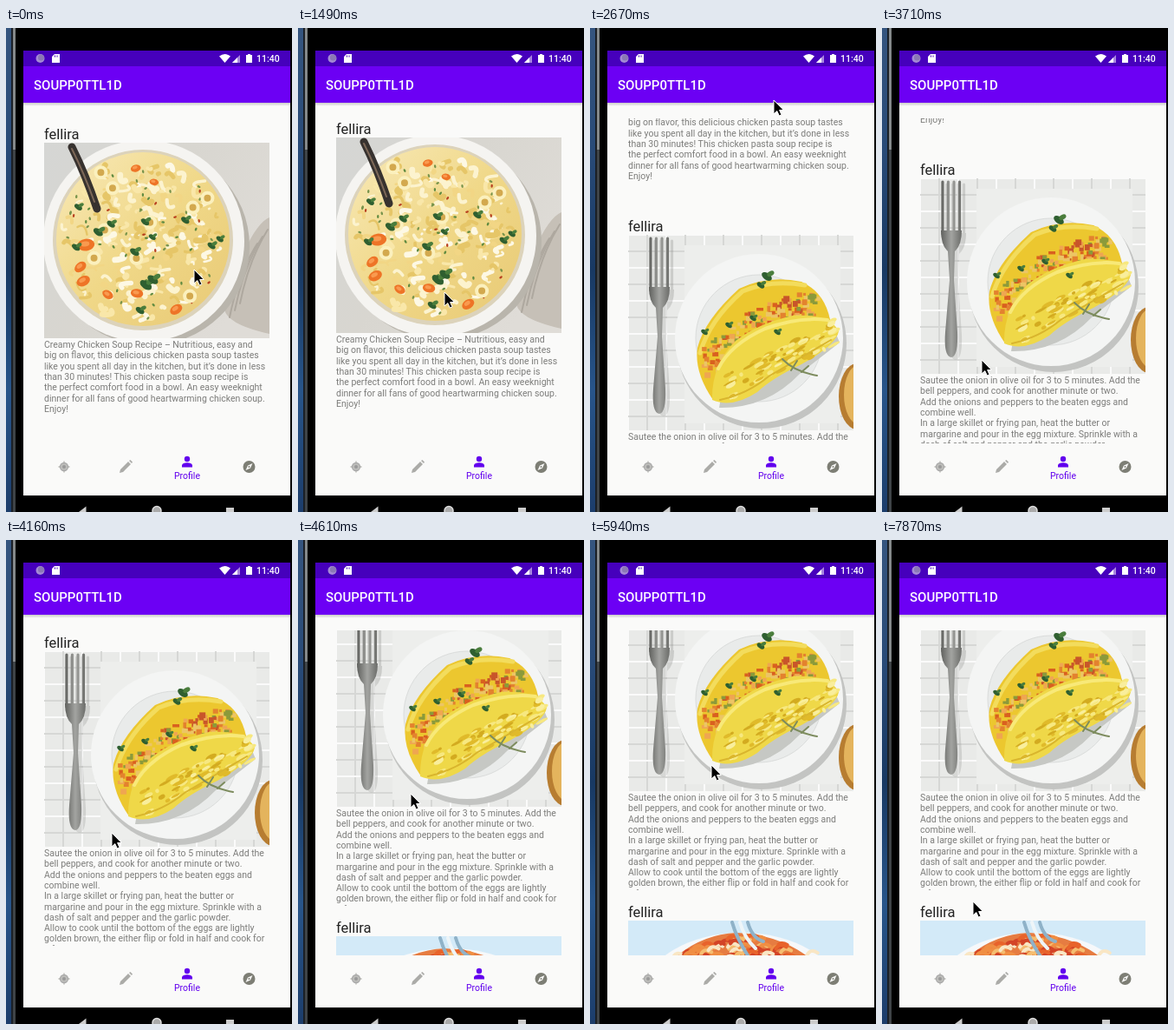
An HTML page that plays this animation: 330x557 px, repeating every 8 s.

```html
<!DOCTYPE html>
<html lang="en">
<head>
<meta charset="utf-8">
<title>Recipe feed</title>
<style>
  html, body { margin: 0; width: 100%; height: 100%; overflow: hidden; background: #000; }
  svg { display: block; width: 330px; height: 557px; font-family: Roboto, sans-serif; }
  .name { font-size: 16.5px; fill: #222; }
  .desc { font-size: 10.5px; fill: #7c7c7a; }
</style>
</head>
<body>
<svg id="stage" viewBox="0 0 330 557"></svg>
<script>
const LOOP = 8000, STEP = 148.5, PITCH = 374;

const linear = k => k;
const easeIn = k => k ** 1.79;
const easeOut = k => 1 - (1 - k) ** 2.1;
const move = (from, to, target, ease = linear) => ({ from, to, target, ease });

// Times are counted in screen updates.
const POINTER = [
  move(0, 1, [214, 271]),
  move(5, 7, [165, 322]),
  move(8, 16, [208, 98], easeIn),
  move(16, 18, [211, 82]),
  move(18, 22, [110, 411]),
  move(23, 31, [129, 291]),
  move(31, 37, [137, 270], easeOut),
  move(38, 40, [139, 258]),
  move(40, 44, [86, 390]),
  move(44, 48, [103, 413]),
  move(50, 53, [104, 415])
];
const SCROLL = [
  move(9, 16, [201], easeIn),
  move(16, 22, [318], easeOut),
  move(24, 31, [424]),
  move(31, 37, [442], easeOut)
];

function follow(position, moves, step) {
  for (const { from, to, target, ease } of moves) {
    if (step <= from) break;
    const k = ease(Math.min(1, (step - from) / (to - from)));
    position = position.map((v, i) => v + (target[i] - v) * k);
  }
  return position.map(Math.floor);
}

const SOUP_TEXT = [
  'Creamy Chicken Soup Recipe – Nutritious, easy and',
  'big on flavor, this delicious chicken pasta soup tastes',
  'like you spent all day in the kitchen, but it’s done in less',
  'than 30 minutes! This chicken pasta soup recipe is',
  'the perfect comfort food in a bowl. An easy weeknight',
  'dinner for all fans of good heartwarming chicken soup.',
  'Enjoy!'
];
const OMELETTE_TEXT = [
  'Sautee the onion in olive oil for 3 to 5 minutes. Add the',
  'bell peppers, and cook for another minute or two.',
  'Add the onions and peppers to the beaten eggs and',
  'combine well.',
  'In a large skillet or frying pan, heat the butter or',
  'margarine and pour in the egg mixture. Sprinkle with a',
  'dash of salt and pepper and the garlic powder.',
  'Allow to cook until the bottom of the eggs are lightly',
  'golden brown, the either flip or fold in half and cook for',
  'a few more minutes.'
];

function randomizer(seed) {
  const next = () => (seed = (seed * 16807) % 2147483647) / 2147483647;
  return {
    range: (a, b) => a + (b - a) * next(),
    pick: list => list[Math.floor(next() * list.length)],
    inDisc(cx, cy, radius) {
      const angle = next() * 2 * Math.PI, r = radius * Math.sqrt(next());
      return [cx + r * Math.cos(angle), cy + r * Math.sin(angle)];
    }
  };
}
const repeat = (n, fn) => Array.from({ length: n }, (_, i) => fn(i)).join('');
const path = (d, fill, extra = '') => `<path d="${d}" fill="${fill}" ${extra}/>`;
const line = (d, color, width) => path(d, 'none', `stroke="${color}" stroke-width="${width}" stroke-linecap="round"`);
const circle = (x, y, r, fill, extra = '') => `<circle cx="${x}" cy="${y}" r="${r}" fill="${fill}" ${extra}/>`;
const ellipse = (x, y, rx, ry, fill, turn = 0) =>
  `<ellipse rx="${rx}" ry="${ry}" fill="${fill}" transform="translate(${x} ${y}) rotate(${turn})"/>`;
const rect = (x, y, w, h, fill) => `<rect x="${x}" y="${y}" width="${w}" height="${h}" fill="${fill}"/>`;
const herb = (x, y, s = 1) =>
  ellipse(x, y, 6 * s, 3.5 * s, '#2f5f30', 35) + ellipse(x + 4 * s, y - 3 * s, 4 * s, 2.5 * s, '#4a7d3c', -30);

function soup() {
  const rnd = randomizer(77);
  const scatter = (n, draw) => repeat(n, () => draw(...rnd.inDisc(114, 111, 92)));
  const noodle = (x, y) => {
    const dx = rnd.range(-11, 11), dy = rnd.range(-9, 9);
    return line(`M${x} ${y}q${dy} ${-dx / 2} ${dx} ${dy}`,
      rnd.pick(['#fcf3cf', '#f9e7a9', '#e6c668', '#fdf8e4', '#f2d685']), rnd.range(2, 7));
  };
  const fleck = (x, y) => ellipse(x, y, 2, 1.2, rnd.pick(['#5f8a40', '#77934b', '#b8401f']), rnd.range(0, 180));
  const ring = (x, y) => circle(x, y, 6, '#d3a94e', 'stroke="#fbf0bd" stroke-width="4"');
  const carrot = (x, y) => {
    const r = rnd.range(5, 10), turn = rnd.range(-40, 40);
    return ellipse(x, y, r, r * .7, '#ee7427', turn) + ellipse(x - 1, y - 1, r * .5, r * .3, '#f99a4f', turn);
  };
  return rect(0, 0, 260, 225, 'url(#table)') +
    path('M260 86Q236 96 208 188Q206 208 260 220Z', '#c6c0b7') +
    repeat(3, i => line(`M${258 - i * 6} ${100 + i * 8}q-22 35 -32 85`, '#aea89f', 2)) +
    ellipse(121, 119, 116, 114, '#b9b5ac') + circle(115, 113, 116, '#f5f4f1') +
    circle(114, 112, 104, '#dcd3bb') + circle(114, 111, 100, 'url(#broth)') +
    scatter(170, noodle) + scatter(60, fleck) + scatter(9, ring) + scatter(8, carrot) +
    scatter(13, (x, y) => herb(x, y, rnd.range(.7, 1.3))) +
    line('M32 5Q48 37 61 76', '#37322f', 9) + line('M32 7Q46 35 58 68', '#7d6858', 2);
}

function omelette() {
  const rnd = randomizer(41);
  const weave = repeat(13, i => line(`M${i * 22} 0V225M0 ${i * 19}H260`, i % 2 ? '#d6d7d5' : '#fafafa', 2));
  // k runs along the fold from lower left to upper right.
  const alongFold = (lift, draw) => () => {
    const k = rnd.range(0, 1);
    return draw(90 + 125 * k, 143 - 65 * k - lift * Math.sin(Math.PI * k));
  };
  const dice = (x, y) => rect(x + rnd.range(-9, 9), y + rnd.range(-14, 16), rnd.range(3, 8), rnd.range(3, 7),
    rnd.pick(['#d9601f', '#e3822e', '#c8552a', '#ecc565', '#8b9a3a', '#efa651']));
  const brown = (x, y) => ellipse(x + rnd.range(18, 30), y + rnd.range(18, 48), rnd.range(2, 8), rnd.range(1, 3),
    rnd.pick(['#d3ab20', '#f7e880', '#e0ba2a', '#f9ee9c']), -28);
  const fork = repeat(4, i => line(`M${26 + i * 6.5} 4V64`, 'url(#steel)', 3.2)) +
    path('M24 60H48Q48 77 40 84L39 117 43 177Q44 205 36 206Q27 205 29 177L34 117 32 84Q24 77 24 60Z', 'url(#steel)');
  return rect(0, 0, 260, 225, '#e9eae8') + weave + rect(65, 12, 180, 205, '#edeeec') +
    `<g transform="translate(5 3)" opacity=".25">${fork}</g>${fork}` +
    circle(154, 125, 98, '#c3c4c2') + circle(151, 119, 97, '#f4f5f4') +
    circle(151, 119, 73, '#e9ebea', 'stroke="#dadcdb"') +
    path('M105 199Q160 200 198 160L244 124 230 90 110 170Z', '#c6c8c4') +
    path('M98 190Q76 158 80 130Q88 98 128 62Q162 46 200 54Q230 68 234 105Z', '#ecc72f') +
    line('M83 136Q94 98 132 65Q165 51 204 58', '#f3dc5c', 5) +
    repeat(150, alongFold(16, dice)) +
    path('M97 190Q96 150 124 122Q150 102 190 93Q232 90 243 111Q240 127 200 149Q166 165 149 181Q120 200 97 190Z', '#efd848') +
    line('M104 154Q118 126 158 108Q196 94 230 98', '#f8e978', 4) +
    repeat(80, alongFold(0, brown)) +
    line('M106 190Q138 183 162 163L234 121', '#d9b52d', 2) +
    herb(160, 48, 1.1) + herb(153, 58, .8) + repeat(4, i => herb(88 + i * 28, 112 - 8 * (i % 3), .7)) +
    line('M178 143Q191 157 218 162M188 156L195 145M200 158L208 151', '#7d8c5e', 2) +
    ellipse(264, 186, 21, 38, '#b77d31') + ellipse(266, 184, 17, 34, '#e4b45d');
}

function pasta() {
  const rnd = randomizer(9);
  const strand = () => {
    const x = rnd.range(52, 208), y = 18 + Math.abs(x - 128) * .25 + rnd.range(0, 26);
    return line(`M${x} ${y}q4 -7 12 -2`, rnd.pick(['#e8632b', '#f08e43', '#d34427', '#f5bd70', '#f9e6c4']), 4);
  };
  return rect(0, 0, 260, 225, '#d3eaf8') + ellipse(131, 82, 112, 68, '#f6f8fa') +
    path('M46 50Q80 16 125 14Q180 16 218 50V110H46Z', '#e67c41') + repeat(95, strand) +
    repeat(3, i => line(`M${120 + i * 9} 2q5 18 18 ${38 - i * 8}`, i % 2 ? '#eef5f8' : '#8fb2c8', 4));
}

const textLines = lines => lines.map((s, i) => `<text class="desc" y="${Math.round(236 + i * 12.3)}">${s}</text>`).join('');
const post = (index, art, lines) => `<g transform="translate(44 ${132 + index * PITCH})">
  <text class="name" y="-4">fellira</text>
  <g clip-path="url(#photo)">${art}</g>
  <g clip-path="url(#caption)">${textLines(lines)}</g></g>`;

const gradient = (id, dir, ...stops) => `<linearGradient id="${id}" ${dir}>` +
  stops.map((c, i) => `<stop offset="${i / (stops.length - 1)}" stop-color="${c}"/>`).join('') + '</linearGradient>';
const down = 'x1="0" y1="0" x2="0" y2="1"';

const defs = `<defs>
  ${gradient('desk', down, '#35557f', '#294b78', '#183963', '#28558a', '#1c3d6b')}
  ${gradient('table', 'x2="1" y2=".6"', '#d5d6d4', '#d8d6d0', '#dfdcd7')}
  ${gradient('broth', 'x2="1" y2="1"', '#f8e9b8', '#f0d888', '#e8c975')}
  ${gradient('steel', 'gradientUnits="userSpaceOnUse" x1="24" x2="48"', '#5f605d', '#a3a4a1', '#6b6c69')}
  ${gradient('shade', down, '#c8c8c8', '#fafaf9')}
  <clipPath id="feedBox"><rect x="44" y="104" width="260" height="374"/></clipPath>
  <clipPath id="photo"><rect width="260" height="225"/></clipPath>
  <clipPath id="caption"><rect y="225" width="262" height="114"/></clipPath>
</defs>`;

const desktop = rect(0, 0, 330, 557, '#000') + rect(0, 0, 6, 557, 'url(#desk)') + rect(6, 0, 2, 557, '#1b2026') +
  rect(8, 0, 3, 557, '#3f4447') + rect(8, 0, 3, 140, '#85898a');

const statusBar = rect(20, 26, 308, 18, '#4600bc') +
  circle(39.5, 35, 5, '#a58bd5') + circle(40.5, 34, 3.5, '#8b78b5') +
  path('M56 30H62V40H53V33Z', '#fff') + repeat(2, i => rect(56 + i * 2.5, 31.5, 1, 2, '#4600bc')) +
  path('M246 32.5Q252.5 27.5 259 32.5L252.5 40Z', '#fff') +
  path('M261 40L270 31V40Z', '#a986e0') + path('M261 40L267 34V40Z', '#fff') +
  path('M277 31H279V30H282V31H284V40H277Z', '#fff') +
  '<text x="289" y="39" font-size="10.5" font-weight="500" fill="#fff">11:40</text>';

const appBar = rect(20, 44, 308, 42, '#6c00f4') + rect(20, 86, 308, 4, 'url(#shade)') +
  '<text x="32" y="71" font-size="15" font-weight="500" fill="#fff">SOUPP0TTL1D</text>';

const systemKeys = path('M84 557L92.5 550.5V557Z', '#ccc') +
  circle(174, 555.5, 5, '#aaa', 'stroke="#ddd" stroke-width="1.5"') + rect(254, 552, 9, 8, '#ccc');

const nav = line('M67 499V511M61 505H73', '#b4b4b0', 1.3) +
  circle(67, 505, 4.5, '#bdbdba', 'stroke="#aaa" stroke-width="1.3"') + circle(67, 505, 2, '#999') +
  path('M131 512L132 508 141 499 144 502 135 511ZM142 498L143.5 497 146 499.5 145 501Z', '#ababa8') +
  circle(209, 496, 3.2, '#6200ee') + path('M203 505.5V503Q204 500.3 209 500.3T215 503V505.5Z', '#6200ee') +
  '<text x="209" y="519" font-size="10.5" text-anchor="middle" fill="#6200ee">Profile</text>' +
  circle(280.5, 505, 7, '#7d7e75') + path('M284.5 501L282 506.5 276.5 509 279 503.5Z', '#fafaf9') + circle(280.5, 505, 1, '#7d7e75');

const stage = document.getElementById('stage');
stage.innerHTML = defs + desktop + rect(20, 26, 308, 512, '#fafaf9') + statusBar + appBar + systemKeys +
  `<g clip-path="url(#feedBox)"><g id="feed">${post(0, soup(), SOUP_TEXT)}${post(1, omelette(), OMELETTE_TEXT)}${post(2, pasta(), [])}</g></g>` +
  nav + path('M1 1V17L4.8 13.6 7.3 19 10 17.9 7.6 12.5H12.3Z', '#000', 'id="pointer" stroke="#fff"');

const feed = document.getElementById('feed');
const pointer = document.getElementById('pointer');

function render(t) {
  const step = Math.floor((t + 8) / STEP);
  const [x, y] = follow([216, 277], POINTER, step);
  const [scroll] = follow([0], SCROLL, step);
  feed.setAttribute('transform', `translate(0 ${-scroll})`);
  pointer.setAttribute('transform', `translate(${x} ${y})`);
}

const start = performance.now();
function tick() {
  render((performance.now() - start) % LOOP);
  requestAnimationFrame(tick);
}
tick();
</script>
</body>
</html>
```
